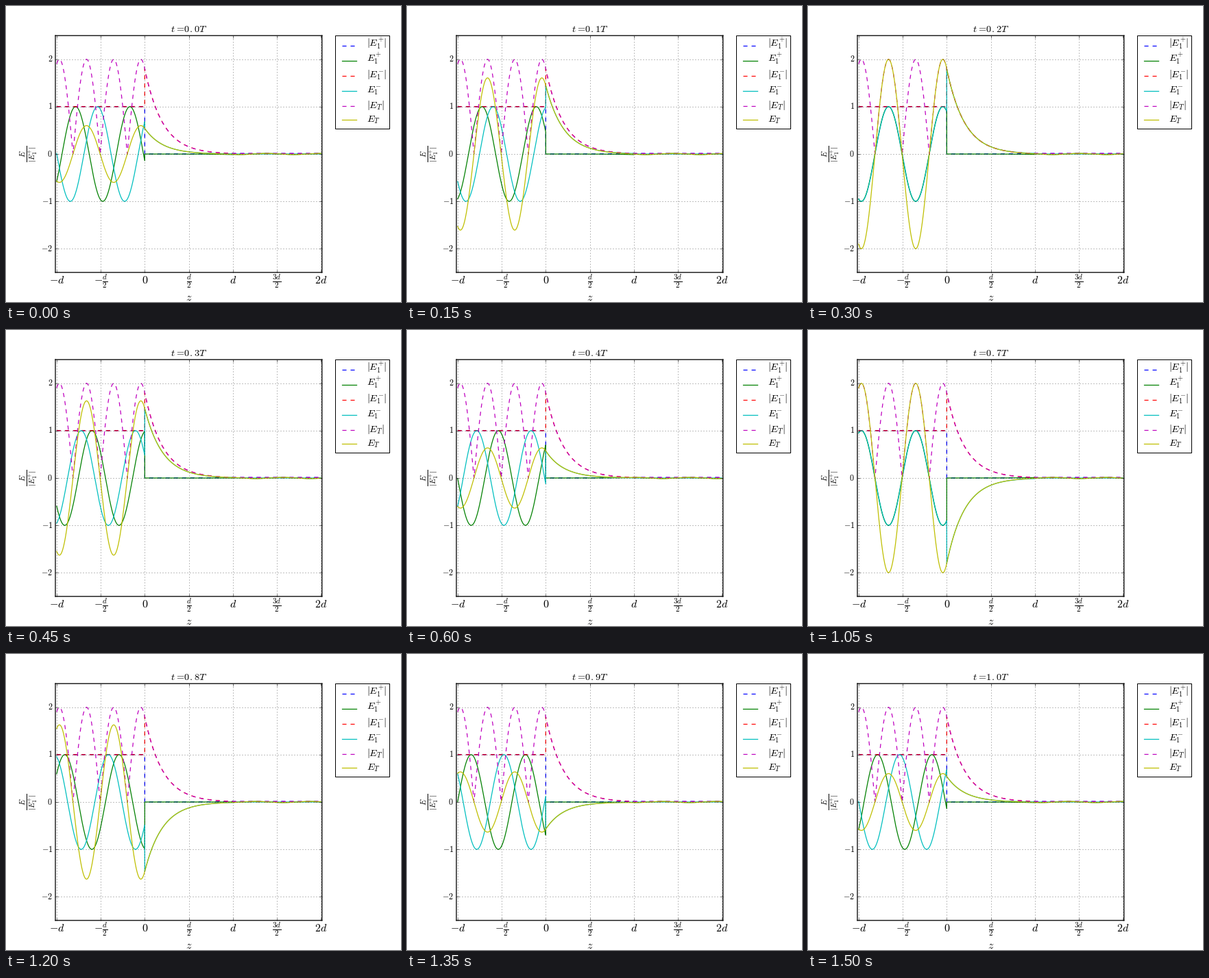
Animation of 576 by 432 pixels, one loop 1650 ms. Source, as a matplotlib script:

```python
import numpy as np
import matplotlib.pyplot as plt
from matplotlib.animation import FuncAnimation
from matplotlib.lines import Line2D
from matplotlib.patches import Rectangle

plt.style.use("classic")
plt.rcParams.update({"mathtext.fontset": "cm", "savefig.dpi": "figure",
                     "lines.linewidth": 1.25})

WIDTH, HEIGHT, DPI = 576, 432, 72
STEPS, INTERVAL = 11, 150

# Standing wave in front of a barrier of thickness 1, weak wave behind it.
K = 10.19                  # wave number, in units of 1/d
DELTA = 0.45               # half of the reflection phase
KAPPA = K * np.tan(DELTA)  # decay rate inside the barrier
PHASE = 1.266              # phase of the total field at the interface

z = np.linspace(-1, 2, 10000)
front, behind = z < 0, z > 1


def by_region(before, inside, after):
    return np.where(front, before, np.where(behind, after, inside))


surface = 2 * np.cos(DELTA) * np.exp(1j * PHASE)
ratio = K / KAPPA
exit_field = 2 * surface * np.exp(-KAPPA) / (1 - 1j * ratio)
growing = exit_field / 2 * (1 + 1j * ratio) * np.exp(KAPPA * (z - 1))
decaying = surface * np.exp(-KAPPA * z)
forward = by_region(np.exp(1j * (K * z + PHASE + DELTA)), growing,
                    exit_field * np.exp(1j * K * (z - 1)))
backward = by_region(np.exp(1j * (PHASE - DELTA - K * z)), decaying, 0)
total = forward + backward

fig = plt.figure(figsize=(WIDTH / DPI, HEIGHT / DPI), dpi=DPI, facecolor="white")
ax = fig.add_axes([0.125, 0.1, 0.675, 0.8])
ax.set(xlim=(-1.0148, 2.0132), ylim=(-2.5, 2.5))
ax.set_xticks(np.arange(-1, 2.1, 0.5),
              [r"$-d$", r"$-\frac{d}{2}$", "$0$", r"$\frac{d}{2}$", "$d$",
               r"$\frac{3d}{2}$", "$2d$"], fontsize=16, va="baseline")
ax.tick_params(axis="x", pad=16.5)
ax.set_yticks(range(-2, 3), [f"${v}$" for v in range(-2, 3)], fontsize=12)
ax.grid(True)
for spine in ax.spines.values():
    spine.set(snap=False, linewidth=1.3)


def put_text(x, y, text, size, **style):
    return fig.text(x / WIDTH, 1 - y / HEIGHT, text, fontsize=size, **style)


title = put_text(267, 38.5, "", 14.2, ha="center", va="baseline")
put_text(267, 429.5, "$z$", 16, ha="center", va="baseline")
put_text(33, 216, r"$\frac{E}{|E_1^{+}|}$", 16, ha="center", va="center", rotation=90)

curves = []
rows = zip((forward, backward, total), ("E_1^{+}", "E_1^{-}", "E_T"),
           ("bg", "rc", "my"), ((58, 80), (102, 124), (146, 166)),
           ((59, 81), (104, 126), (149, 170)))

fig.add_artist(Rectangle((480.5 / WIDTH, 1 - 179.5 / HEIGHT), 79 / WIDTH, 136 / HEIGHT,
                         facecolor="white", edgecolor="black", linewidth=1, snap=False))
for field, name, colors, line_ys, text_ys in rows:
    labels = (f"$|{name}|$", f"${name}$")
    for color, dash, label, line_y, text_y in zip(colors, ("--", "-"), labels,
                                                  line_ys, text_ys):
        y = 1 - line_y / HEIGHT
        fig.add_artist(Line2D([490 / WIDTH, 511 / WIDTH], [y, y],
                              color=color, linestyle=dash))
        put_text(526, text_y, label, 14.4, va="baseline")
    ax.plot(z, abs(field), colors[0] + "--")
    curves.append((ax.plot(z, field.real, colors[1])[0], field))


def update(step):
    t = step / (STEPS - 1)
    for curve, field in curves:
        curve.set_ydata((field * np.exp(-2j * np.pi * t)).real)
    digits = r"\hspace{0.06}".join(rf"\mathbf{{{c}}}" for c in f"{t:.1f}")
    title.set_text(rf"$t\hspace{{0.07}}=\hspace{{-0.2}}{digits}T$")
    return [title] + [curve for curve, _ in curves]


anim = FuncAnimation(fig, update, frames=STEPS, interval=INTERVAL,
                     repeat=True, repeat_delay=0, blit=False)
plt.show()
```
